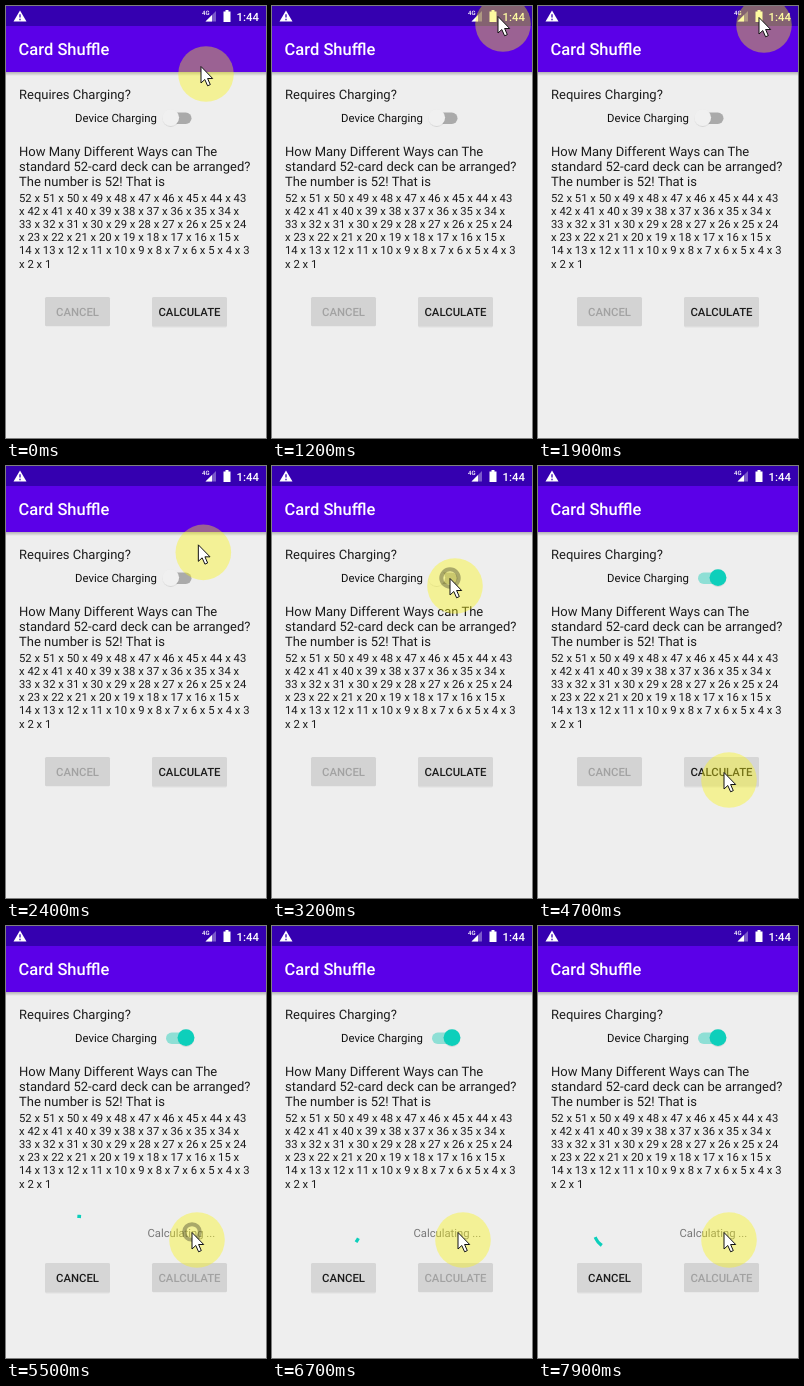
Animation of 260x432 px, one loop 8 s. Source, as an HTML page:

```html
<!DOCTYPE html>
<html lang="en">
<head>
<meta charset="utf-8">
<title>Card Shuffle</title>
<style>
  html, body { margin: 0; width: 100%; height: 100%; overflow: hidden; background: #eee; }
  svg { display: block; width: 260px; height: 432px; font-family: Roboto, "Open Sans", sans-serif; }
  text { white-space: pre; fill: #1c1c1c; text-rendering: geometricPrecision; }
  .body { font-size: 13px; }
  .small { font-size: 11.375px; }
  .strong { font-weight: 500; }
  .white { fill: #fff; }
</style>
</head>
<body>
<svg viewBox="0 0 260 432">
  <defs>
    <linearGradient id="fade" x2="0" y2="1">
      <stop stop-color="#000" stop-opacity=".25"/>
      <stop offset="1" stop-color="#000" stop-opacity="0"/>
    </linearGradient>
    <filter id="shadow" x="-20%" y="-30%" width="140%" height="170%">
      <feDropShadow dx="0" dy=".6" stdDeviation=".5" flood-opacity=".18"/>
    </filter>
  </defs>
  <rect width="260" height="432" fill="#eee"/>

  <rect y="66" width="260" height="4" fill="url(#fade)"/>
  <rect width="260" height="66" fill="#5b00e8"/>
  <rect width="260" height="20" fill="#3500b0"/>
  <path d="M14 4.5 L20.5 15.5 H7.5Z" class="white"/>
  <path d="M14 8.2 V11.6 M14 12.8 V14.2" stroke="#3500b0" stroke-width="1.3"/>
  <text x="196" y="9" font-size="6" class="strong white">4G</text>
  <path d="M210 5 V15.5 H199.5Z" fill="#fff" fill-opacity=".35"/>
  <path d="M206 9 V15.5 H199.5Z" class="white"/>
  <path d="M217.5 5.5 H219.5 V4 H222.5 V5.5 H224.5 V16 H217.5Z" class="white"/>
  <text x="230.5" y="15" class="small strong white">1:44</text>
  <text x="12.6" y="49.2" font-size="16.5" class="strong white">Card Shuffle</text>

  <text x="13" y="93" class="body">Requires Charging?</text>
  <text x="69" y="116" class="small" style="fill:#111">Device Charging</text>
  <rect id="track" x="160" y="106.6" width="25.5" height="11.4" rx="5.7"/>
  <circle id="thumb" cy="111.6" r="8.4" filter="url(#shadow)"/>

  <g id="prose" class="body"></g>
  <g id="product" font-size="11.28"></g>

  <g id="progress">
    <path id="arc" fill="none" stroke="#0ccfbb" stroke-width="3.2" stroke-linecap="square"/>
    <text x="141.5" y="310.8" font-size="11.25" style="fill:#777">Calculating ...</text>
  </g>
  <g id="buttons" class="small strong" text-anchor="middle">
    <g id="cancel"><rect x="39" y="291" width="65" height="29.3" rx="1.5"/><text x="71.5" y="310">CANCEL</text></g>
    <g id="calculate"><rect x="146" y="291" width="75" height="29.3" rx="1.5"/><text x="183.5" y="310">CALCULATE</text></g>
  </g>

  <g id="pointer">
    <circle cx="5" cy="8" r="27.8" fill="#fbf612" fill-opacity=".4"/>
    <circle id="ring" fill="none" stroke="#46462c" stroke-width="4"/>
    <path d="M0 0 V16.5 L3.8 13 L6.6 19.3 L9.3 18.1 L6.6 12 H11.7Z" transform="translate(0 .5)" fill="#fff" stroke="#111" stroke-linejoin="round"/>
  </g>
</svg>
<script>
const LOOP = 8000, STEP = 100;
const TOGGLE_AT = 3300, RESULT_AT = 5400, SPIN_AT = 5480;
const CLICKS = [2900, 5230], CLICK_TIME = 430;
const SPIN_CYCLE = 1333;

// time, x, y
const PATH = [
  [0, 195, 60], [500, 226, 18], [900, 219, 12], [1200, 226, 10],
  [1550, 200, 31], [1900, 221, 11], [2000, 221, 11], [2600, 178, 112],
  [3900, 178, 112], [4100, 187, 233], [4300, 186, 306], [LOOP, 186, 306]
];

const $ = id => document.getElementById(id);
const clamp = v => Math.min(1, Math.max(0, v));
const set = (el, attrs) => { for (const k in attrs) el.setAttribute(k, attrs[k]); };
const factors = (from, to) => Array.from({ length: from - to + 1 }, (_, i) => from - i).join(' x ');

function addLines(id, lines, y, lineHeight) {
  $(id).innerHTML = lines.map((line, i) => `<text x="13" y="${y + i * lineHeight}">${line}</text>`).join('');
}

addLines('prose', [
  'How Many Different Ways can The',
  'standard 52-card deck can be arranged?',
  'The number is 52! That is'
], 149.5, 15.2);
addLines('product', [
  factors(52, 43),
  `x ${factors(42, 34)} x`,
  factors(33, 24),
  `x ${factors(23, 15)} x`,
  factors(14, 3),
  `x ${factors(2, 1)}`
], 196, 13.1);

// cubic-bezier(.4, 0, .2, 1)
function ease(x) {
  x = clamp(x);
  let lo = 0, hi = 1;
  for (let i = 0; i < 20; i++) {
    const s = (lo + hi) / 2, r = 1 - s;
    if (1.2 * r * r * s + .6 * r * s * s + s * s * s < x) lo = s; else hi = s;
  }
  return 3 * (1 - lo) * lo * lo + lo ** 3;
}

function pointerAt(t) {
  const i = Math.max(1, PATH.findIndex(key => key[0] >= t));
  const a = PATH[i - 1], b = PATH[i];
  const k = clamp((t - a[0]) / (b[0] - a[0]));
  return [1, 2].map(n => a[n] + (b[n] - a[n]) * k);
}

function arcPath(elapsed) {
  const phase = elapsed % SPIN_CYCLE / SPIN_CYCLE;
  const base = phase * .25 + elapsed / (SPIN_CYCLE * 5) * 2;
  const from = base + .75 * ease(phase * 2 - 1);
  const to = Math.max(from + .005, base + .75 * ease(phase * 2));
  const point = turn => {
    const a = turn * 2 * Math.PI;
    return `${72 + 15.6 * Math.sin(a)} ${306 - 15.6 * Math.cos(a)}`;
  };
  return `M${point(from)} A15.6 15.6 0 ${to - from > .5 ? 1 : 0} 1 ${point(to)}`;
}

function setButton(id, enabled) {
  const [box, label] = $(id).children;
  set(box, { fill: enabled ? '#d6d6d6' : '#d3d3d3', filter: enabled ? 'url(#shadow)' : 'none' });
  label.style.fill = enabled ? '#1c1c1c' : '#a2a2a2';
}

function render(t) {
  const on = ease((t - TOGGLE_AT) / 250);
  set($('thumb'), { cx: 164.7 + 15.3 * on, fill: on > .5 ? '#0ccfbb' : '#f0f0f0' });
  set($('track'), { fill: on > .5 ? '#8edfd5' : '#aaa' });

  const running = t >= RESULT_AT;
  set($('progress'), { visibility: running ? 'visible' : 'hidden' });
  set($('arc'), { d: t >= SPIN_AT ? arcPath(t - SPIN_AT) : '' });
  set($('buttons'), { transform: `translate(0 ${running ? 46 : 0})` });
  setButton('cancel', running);
  setButton('calculate', !running);

  const [x, y] = pointerAt(t);
  set($('pointer'), { transform: `translate(${x} ${y})` });
  const age = CLICKS.map(c => (t - c) / CLICK_TIME).find(a => a > 0 && a < 1);
  set($('ring'), { r: age ? 12.5 * age : 0, opacity: age ? .42 : 0 });
}

function tick(now) {
  render(Math.floor(now % LOOP / STEP) * STEP);
  requestAnimationFrame(tick);
}
render(0);
requestAnimationFrame(tick);
</script>
</body>
</html>
```
